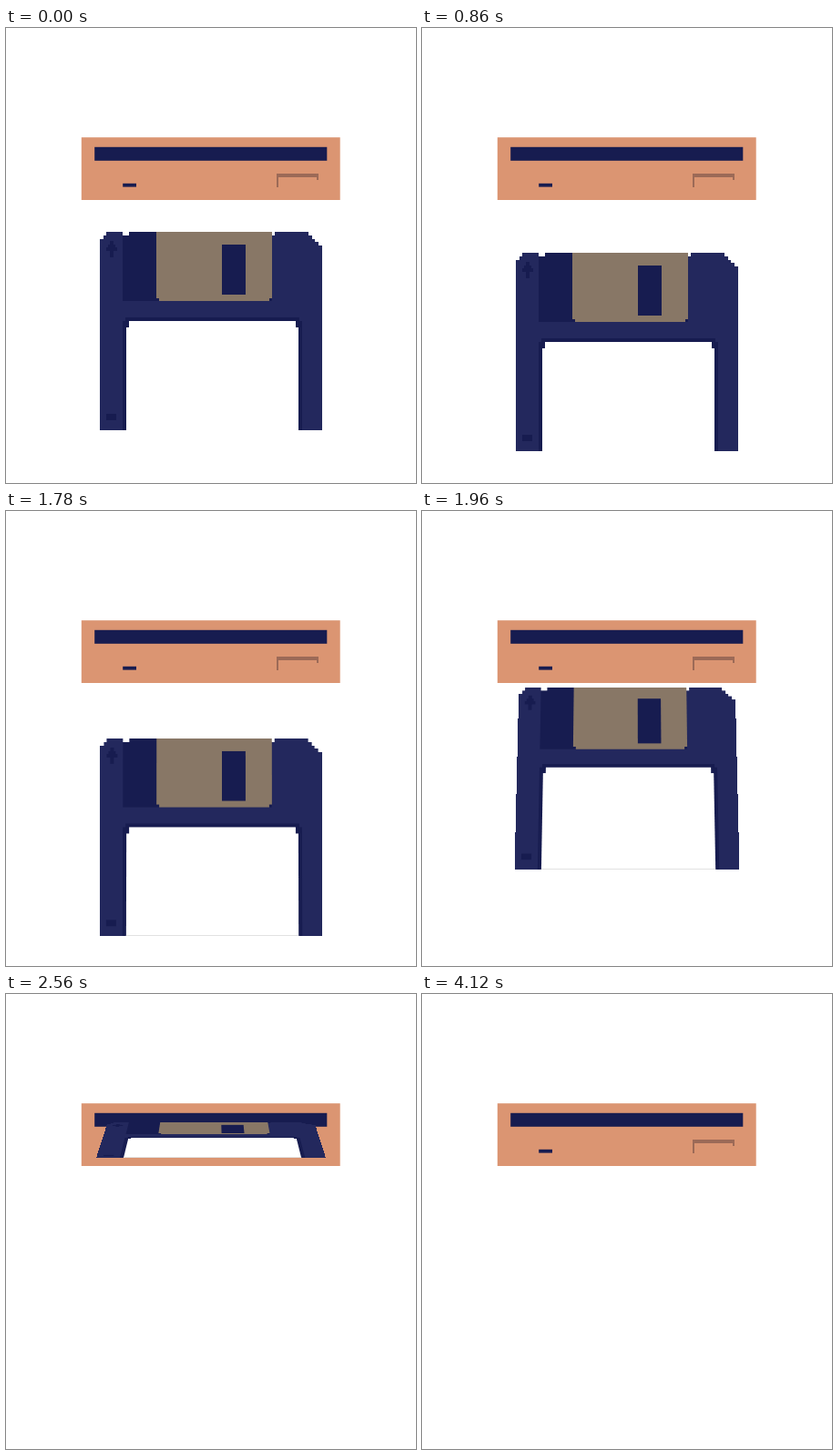
An HTML page with a canvas that plays this animation: 450 px wide and 500 px high, repeating every 4160 ms.

```html
<!DOCTYPE html>
<html lang="en">
<head>
<meta charset="utf-8">
<title>Floppy disk</title>
<style>
html, body { margin: 0; width: 100%; height: 100%; overflow: hidden; background: #fff; }
canvas { display: block; }
</style>
</head>
<body>
<canvas id="stage" width="450" height="500"></canvas>
<script>
const ctx = document.getElementById('stage').getContext('2d');
const LOOP = 4160;
const NAVY = '#171c50', BODY = '#23285d', TAN = '#887766';
const PEACH = '#db9572', GROOVE = '#9c6a57', WHITE = '#fff';
const DISK = { x: 103, y: 224, w: 244, h: 218 };
const DIP = 37, DIP_START = 380, LIFT_START = 1711, LIFT_TIME = 1430;
// AXIS is the disk row that keeps its width, PIVOT the one that travels to the slot.
const DEPTH = 2010, AXIS = 153, PIVOT = 252, SLOT_Y = 142;

// Fills the area between two corners.
function box(c, color, x0, y0, x1, y1) {
  c.fillStyle = color;
  c.fillRect(x0, y0, x1 - x0, y1 - y0);
}

// cubic-bezier(.25, .1, .25, 1)
function ease(x) {
  if (x <= 0) return 0;
  if (x >= 1) return 1;
  let lo = 0, hi = 1;
  for (let i = 0; i < 24; i++) {
    const s = (lo + hi) / 2;
    if (0.75 * s * (1 - s) + s * s * s < x) lo = s; else hi = s;
  }
  const s = lo, r = 1 - s;
  return 0.3 * s * r * r + 3 * s * s * r + s * s * s;
}

function makeDisk() {
  const art = document.createElement('canvas');
  art.width = DISK.w;
  art.height = DISK.h;
  const c = art.getContext('2d');
  c.translate(-DISK.x, -DISK.y);
  // body with stepped corners
  box(c, BODY, 110, 224, 332, 228);
  box(c, BODY, 107, 228, 336, 232);
  box(c, BODY, 103, 232, 339, 235);
  box(c, BODY, 103, 235, 343, 239);
  box(c, BODY, 103, 239, 347, 442);
  // shutter track and shutter
  box(c, NAVY, 128, 224, 168, 300);
  box(c, TAN, 165, 224, 292, 297);
  box(c, TAN, 168, 297, 289, 300);
  box(c, NAVY, 165, 297, 168, 300);
  box(c, NAVY, 289, 297, 292, 300);
  box(c, NAVY, 237, 238, 263, 293);
  c.clearRect(128, 224, 7, 4);
  c.clearRect(292, 224, 3, 4);
  // insert arrow and corner mark
  box(c, NAVY, 114, 234, 118, 252);
  box(c, NAVY, 112, 238, 120, 245);
  box(c, NAVY, 110, 241, 122, 245);
  box(c, NAVY, 110, 424, 121, 431);
  // label
  box(c, NAVY, 131, 318, 322, 329);
  box(c, NAVY, 128, 322, 325, 442);
  box(c, WHITE, 135, 322, 318, 329);
  box(c, WHITE, 132, 329, 321, 442);
  return art;
}

const disk = makeDisk();

function drawDrive() {
  box(ctx, PEACH, 82.8, 120.2, 366.7, 189);
  box(ctx, NAVY, 97.2, 130.8, 352.3, 145.8);
  box(ctx, NAVY, 128.2, 170.8, 143, 174.6);
  box(ctx, GROOVE, 297, 160, 343, 164);
  box(ctx, GROOVE, 297, 164, 299, 175);
  box(ctx, GROOVE, 341, 164, 343, 167);
}

// Draws the disk row by row, tilting backwards as it rises into the slot.
function drawTilted(t) {
  // the edge stays visible, so the disk never turns fully flat
  const p = Math.min(0.985, ease((t - LIFT_START) / LIFT_TIME));
  const sin = Math.sin(p * Math.PI / 2), cos = Math.cos(p * Math.PI / 2);
  const start = DISK.y + DIP + PIVOT;
  const mid = start + (SLOT_Y - start) * p - (PIVOT - AXIS) * cos;
  const scale = u => DEPTH / (DEPTH - u * sin);
  const project = v => mid + (v - AXIS) * cos * scale(v - AXIS);
  const top = Math.round(project(0)), bottom = Math.round(project(DISK.h));
  const cx = DISK.x + DISK.w / 2;
  for (let y = top; y < bottom; y++) {
    const d = y + 0.5 - mid;
    const u = d * DEPTH / (cos * DEPTH + d * sin);
    const v = Math.max(0, Math.min(DISK.h - 1, u + AXIS - 0.5));
    const w = DISK.w * scale(u);
    ctx.drawImage(disk, 0, v, DISK.w, 1, cx - w / 2, y, w, 1);
  }
  const half = 94.5 * scale(DISK.h - AXIS);
  const labelX = cx + 1.5;
  if (p < 0.97) box(ctx, '#e2e2e2', labelX - half, bottom - 1, labelX + half, bottom);
}

// The edge of the disk still showing inside the slot.
function drawEdge(t) {
  const g = ctx.createLinearGradient(135, 0, 318, 0);
  const core = t < 3920 ? WHITE : '#e6c3b0';
  g.addColorStop(0, PEACH);
  g.addColorStop(0.1, '#e0ad90');
  g.addColorStop(0.22, core);
  g.addColorStop(0.82, core);
  g.addColorStop(0.92, '#e0ad90');
  g.addColorStop(1, PEACH);
  ctx.globalAlpha = t < 4100 ? 1 : 0.5;
  box(ctx, g, 135, SLOT_Y, 318, SLOT_Y + 1);
  ctx.globalAlpha = 1;
}

function draw(t) {
  box(ctx, WHITE, 0, 0, 450, 500);
  drawDrive();
  if (t < LIFT_START) {
    const dip = DIP * ease((t - DIP_START) / (LIFT_START - DIP_START));
    ctx.drawImage(disk, DISK.x, DISK.y + Math.round(dip));
  } else if (t < 3160) {
    drawTilted(t);
  } else if (t < 4120) {
    drawEdge(t);
  }
}

const began = performance.now();
function tick() {
  draw((performance.now() - began) % LOOP);
  requestAnimationFrame(tick);
}
tick();
</script>
</body>
</html>
```
